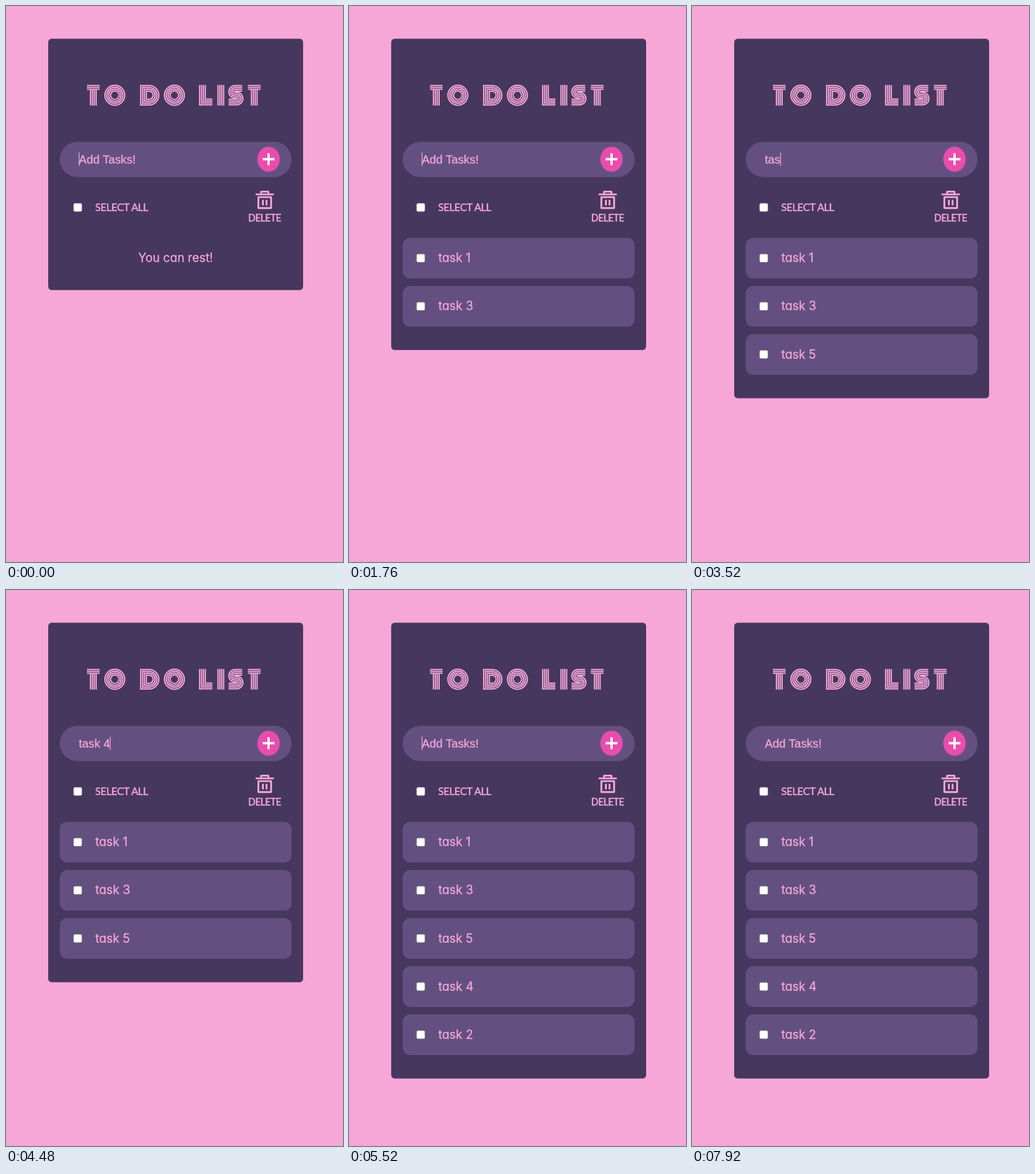
Write an HTML page that moves like this. It is 583 px wide and 960 px high and loops after 8 s.

```html
<!DOCTYPE html>
<html lang="en">
<head>
<meta charset="utf-8">
<title>To do list</title>
<style>
  html, body { margin: 0; width: 100%; height: 100%; overflow: hidden; background: #f6a7d7; }
  svg { display: block; width: 100%; height: 100%; }
  text { fill: #f6a7d7; stroke: #f6a7d7; stroke-width: 0.3px; white-space: pre; }
  .body { font: 400 20.8px Inter, sans-serif; font-feature-settings: "cv11"; }
  .caps { font: 400 17.8px Lato, sans-serif; letter-spacing: -0.02em; stroke-width: 0.5px; }
  .small { font-size: 16.4px; }
  .input { font: 400 20.2px "Liberation Sans", Arial, sans-serif; }
  .icon { fill: none; stroke: #f6a7d7; stroke-width: 2; }
</style>
</head>
<body>
<svg id="stage" viewBox="0 0 583 960">
  <rect id="card" x="73" y="56.5" width="441" height="434" rx="6" fill="#46375f"/>
  <g id="title" fill="none"></g>

  <rect x="93" y="234.5" width="401" height="61" rx="30.5" fill="#635081"/>
  <text id="entry" class="input" x="126" y="271.7"></text>
  <rect id="caret" y="253" width="1.3" height="23" fill="#f6a7d7"/>
  <ellipse cx="454.2" cy="264.6" rx="19.6" ry="21.9" fill="#e94dac" stroke="#8d4f93"/>
  <path d="M444 264.5h20.4M454.2 254.3v20.4" stroke="#fff" stroke-width="3.8"/>

  <text class="caps" x="154.3" y="353.9">SELECT ALL</text>
  <g class="icon" transform="translate(428.7 315.8) scale(1.575)">
    <path d="M8 5V3H16V5M2 6H22M10 12v6M14 12v6" stroke-linejoin="round"/>
    <rect x="5" y="9" width="14" height="12" stroke-linejoin="round"/>
  </g>
  <text class="caps small" x="447.5" y="372.4" text-anchor="middle">DELETE</text>
  <text id="rest" class="body" x="293.3" y="442.4" text-anchor="middle">You can rest!</text>
  <g id="rows"></g>
</svg>
<script>
const LOOP = 8000, BLINK = 320, PITCH = 83.1;
const PINK = '#f6a7d7', CARD = '#46375f';
const TASKS = ['task 1', 'task 3', 'task 5', 'task 4', 'task 2'];

// [time, text in the field, tasks in the list]
const EVENTS = [
  [0, '', 0],
  [480, 't', 0], [560, 'tas', 0], [640, 'task ', 0], [720, 'task 1', 0], [800, '', 1],
  [1280, 't', 1], [1360, 'tas', 1], [1440, 'task', 1], [1520, 'task ', 1], [1600, 'task 3', 1], [1680, '', 2],
  [2080, 't', 2], [2160, 'tas', 2], [2240, 'task', 2], [2320, 'task ', 2], [2560, 'task 5', 2], [2720, '', 3],
  [3440, 't', 3], [3520, 'tas', 3], [3600, 'task', 3], [3680, 'task ', 3], [4480, 'task 4', 3], [4640, '', 4],
  [5040, 't', 4], [5120, 'tas', 4], [5200, 'task', 4], [5280, 'task 2', 4], [5440, '', 5]
];

const $ = id => document.getElementById(id);

function add(parent, tag, attrs, text) {
  const el = document.createElementNS('http://www.w3.org/2000/svg', tag);
  for (const key in attrs) el.setAttribute(key, attrs[key]);
  if (text) el.textContent = text;
  parent.append(el);
  return el;
}

// Four parallel lines along one centre line
function inline(d) {
  [12, 7.6, 5.4, 1].forEach((width, i) =>
    add($('title'), 'path', { d, stroke: i % 2 ? CARD : PINK, 'stroke-width': width }));
}

function letterT(x) {
  inline(`M${x} 144.8V171.8`);
  for (const y of [137.3, 140.5, 143.7]) {
    add($('title'), 'path', { d: `M${x - 11} ${y}h22`, stroke: PINK, 'stroke-width': 2.1 });
  }
}

const letterO = x => inline(`M${x - 12.3} 154.1a12.3 12.3 0 1 1 24.6 0a12.3 12.3 0 1 1 -24.6 0z`);

function drawTitle() {
  letterT(151);
  letterO(188.3);
  inline('M237.9 142.2H247.6a11.9 11.9 0 0 1 0 23.8H237.9z');
  letterO(291.3);
  inline('M339.9 136.5V165.8H357');
  inline('M371.6 136.5V171.8');
  inline('M408.5 142.2H396.3a5.9 5.9 0 0 0 0 11.8H399a5.9 5.9 0 0 1 0 11.8H385');
  letterT(429.5);
}

function checkbox(parent, y) {
  add(parent, 'rect', { x: 116.8, y: y - 7.3, width: 14.6, height: 14.6, rx: 2.6, fill: '#fff', stroke: '#76707c' });
}

function addRow(label, i) {
  const row = add($('rows'), 'g', { transform: `translate(0 ${i * PITCH})` });
  add(row, 'rect', { x: 93, y: 400.3, width: 401, height: 70.3, rx: 13, fill: '#635081' });
  checkbox(row, 435.4);
  add(row, 'text', { class: 'body', x: 154.5, y: 442.4 }, label);
  return row;
}

drawTitle();
checkbox($('stage'), 347.8);
const rows = TASKS.map(addRow);

function render(t) {
  const [start, typed, count] = EVENTS.findLast(e => e[0] <= t);
  const entry = $('entry');
  const label = typed || 'Add Tasks!';
  if (entry.textContent !== label) entry.textContent = label;

  const caretX = 125.8 + (typed ? entry.getComputedTextLength() : 0);
  $('caret').setAttribute('x', caretX);
  const lit = Math.floor((t - start) / BLINK) % 2 === 0;
  $('caret').style.display = lit ? '' : 'none';

  $('rest').style.display = count ? 'none' : '';
  rows.forEach((row, i) => row.style.display = i < count ? '' : 'none');
  const bottom = count ? 511 + (count - 1) * PITCH : 490.6;
  $('card').setAttribute('height', bottom - 56.5);
}

const begin = performance.now();
function tick() {
  render((performance.now() - begin) % LOOP);
  requestAnimationFrame(tick);
}
tick();
</script>
</body>
</html>
```
